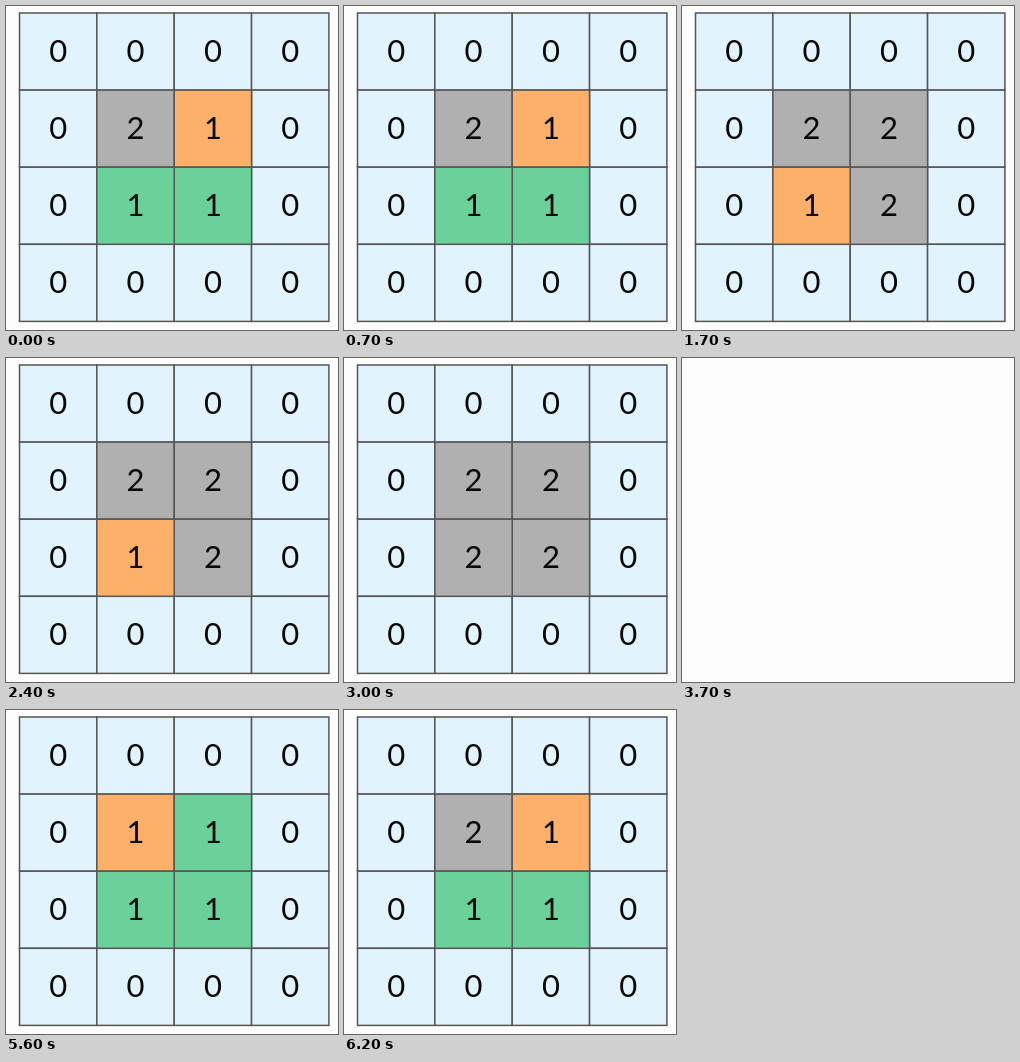
Write an HTML page that moves like this. It is 332 px wide and 324 px high and loops after 6.3 s.

```html
<!DOCTYPE html>
<html lang="en">
<head>
<meta charset="utf-8">
<title>Flood fill on a grid</title>
<style>
  html, body { margin: 0; width: 100%; height: 100%; overflow: hidden; background: #fdfdfd; }
  svg { display: block; width: 332px; height: 324px; }
  rect { stroke: #555; stroke-width: 1.5px; }
  text { font: 31px Lato, "Open Sans", sans-serif; text-anchor: middle; fill: #080808; }
</style>
</head>
<body>
<svg id="stage" viewBox="0 0 332 324"><g id="grid"></g></svg>
<script>
const LOOP = 6300;
const LEFT = 13.5, TOP = 7, CELL_W = 77.35, CELL_H = 77.1;

// Cell kinds: digit and fill
const KINDS = {
  empty:   ["0", "#e1f3fd"],
  open:    ["1", "#6ad19a"],
  current: ["1", "#fdb06a"],
  filled:  ["2", "#b0b0b0"]
};

// Order in which the inner cells are filled: [row, column]
const PATH = [[1, 1], [1, 2], [2, 2], [2, 1]];

// [start time, position on the path]; null hides the grid
const STEPS = [[0, 1], [800, 2], [1700, 3], [2700, 4], [3700, null], [4700, 0], [5700, 1]];

const grid = document.getElementById("grid");

function add(name, attributes) {
  const node = document.createElementNS("http://www.w3.org/2000/svg", name);
  for (const key in attributes) node.setAttribute(key, attributes[key]);
  return grid.appendChild(node);
}

function makeCell(row, col) {
  const x = LEFT + col * CELL_W, y = TOP + row * CELL_H;
  const box = add("rect", { x, y, width: CELL_W, height: CELL_H });
  const label = add("text", { x: x + CELL_W / 2, y: y + CELL_H / 2 + 10 });
  return kind => {
    const [digit, fill] = KINDS[kind];
    box.setAttribute("fill", fill);
    label.textContent = digit;
  };
}

for (let i = 0; i < 16; i++) {
  const row = i >> 2, col = i % 4;
  if (!PATH.some(([r, c]) => r === row && c === col)) makeCell(row, col)("empty");
}
const pathCells = PATH.map(([row, col]) => makeCell(row, col));

let shown;
function draw() {
  const time = performance.now() % LOOP;
  const position = STEPS.filter(([start]) => start <= time).pop()[1];
  if (position !== shown) {
    shown = position;
    grid.style.display = position === null ? "none" : "";
    if (position !== null) {
      pathCells.forEach((paint, i) =>
        paint(i < position ? "filled" : i === position ? "current" : "open"));
    }
  }
  requestAnimationFrame(draw);
}
draw();
</script>
</body>
</html>
```
